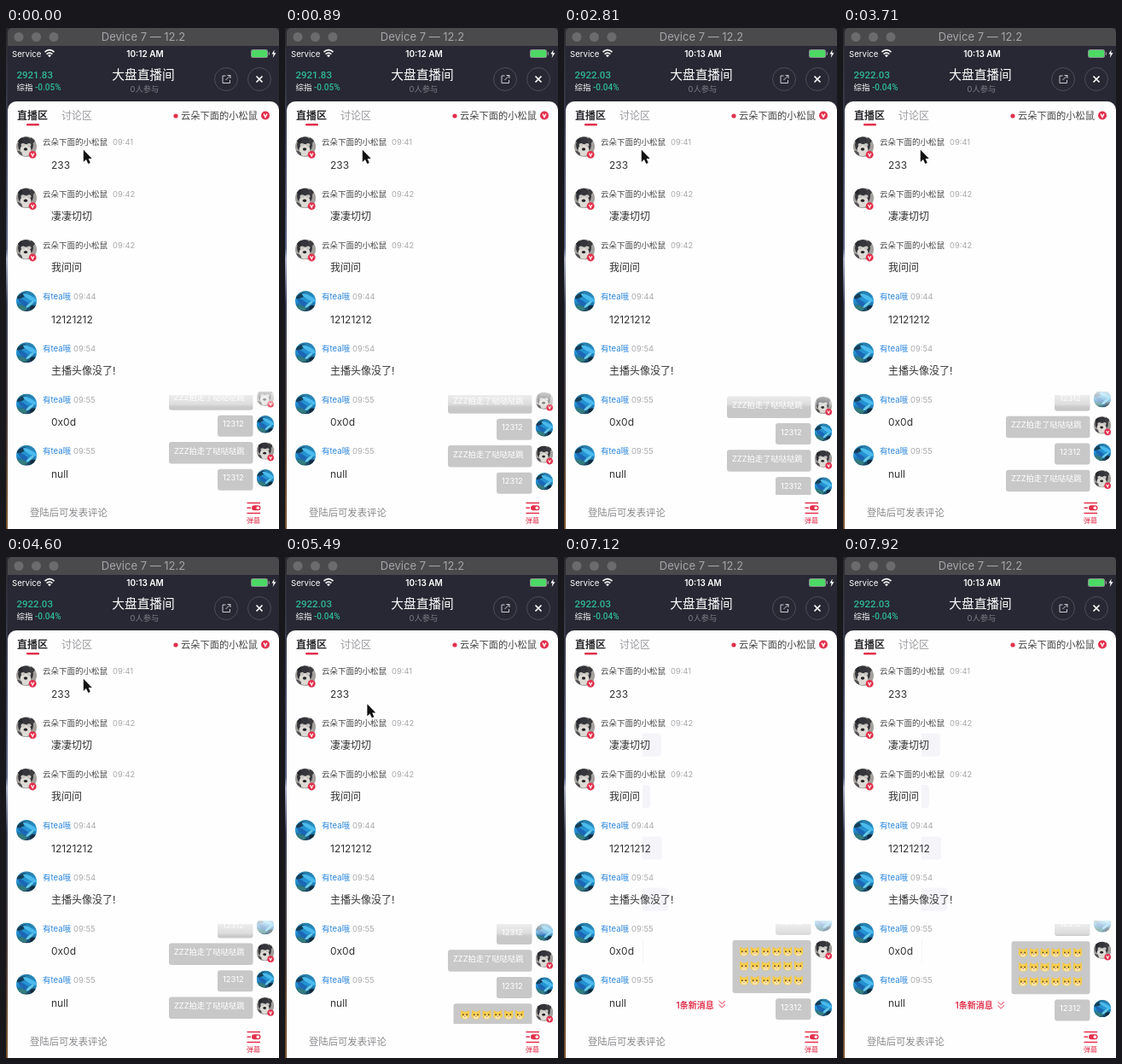
Animation, 320 px wide and 587 px high, one loop 8.02 s. Source, as an HTML page with a canvas:

```html
<!DOCTYPE html>
<html lang="zh">
<head>
<meta charset="utf-8">
<style>
html, body { margin: 0; width: 100%; height: 100%; overflow: hidden; background: #fff; }
canvas { display: block; width: 320px; height: 587px; }
</style>
</head>
<body>
<canvas id="stage"></canvas>
<script>
const canvas = document.getElementById('stage');
const c = canvas.getContext('2d');
const dpr = window.devicePixelRatio || 1;
canvas.width = 320 * dpr;
canvas.height = 587 * dpr;

const LOOP = 8020, STEP = 147, SLIDE = 450;
const RED = '#e2304c', GREEN = '#2fb996';
const HOST = '云朵下面的小松鼠', GUEST = '有tea哦';
const SANS = 'Inter, "Noto Sans CJK SC", "Noto Sans CJK", sans-serif';
const DIGITS = 'Roboto, "Noto Sans CJK SC", sans-serif';

const messages = [
  [HOST, '09:41', '233'], [HOST, '09:42', '凄凄切切', 114], [HOST, '09:42', '我问问', 101],
  [GUEST, '09:44', '12121212', 115], [GUEST, '09:54', '主播头像没了!', 150],
  [GUEST, '09:55', '0x0d', 93], [GUEST, '09:55', 'null']
];

// Floating comments: kinds, and the moment each one slides in
const kinds = {
  A: { x: 248, h: 25, text: '12312' },
  B: { x: 191, h: 25.5, text: 'ZZZ拍走了哒哒哒跳', host: true },
  E: { x: 197.5, h: 62, host: true }
};
const queue = [...'BABABABABABABAEAEAEA'];
const starts = [-9e3, -9e3, -9e3, -400, 310, 556, 1050, 1590, 2230, 2523,
  3310, 3700, 4080, 4570, 5250, 5720, 6290, 6670, 7050, 7430];

// Pointer path: time, x, y
const path = [[5300, 90, 142], [6150, 124, 322], [6321, 142, 392],
  [6468, 186, 465], [6615, 225, 535], [6762, 265, 600]];

const clamp = v => Math.min(1, Math.max(0, v));
const ease = p => p < .5 ? 2 * p * p : 1 - 2 * (1 - p) ** 2;

function text(s, x, y, size, color, weight = 400, align = 'left', family = SANS) {
  c.font = `${weight} ${size}px ${family}`;
  c.textAlign = align;
  c.fillStyle = color;
  c.fillText(s, x, y);
}
function rect(x, y, w, h, color, r = 0) {
  c.fillStyle = color;
  c.beginPath();
  c.roundRect(x, y, w, h, r);
  c.fill();
}
function oval(x, y, rx, color, ry = rx, turn = 0) {
  c.fillStyle = color;
  c.beginPath();
  c.ellipse(x, y, rx, ry, turn, 0, 7);
  c.fill();
}
function line(d, color, width = 1) {
  c.strokeStyle = color;
  c.lineWidth = width;
  c.stroke(new Path2D(d));
}
function clipped(shape, draw) {
  c.save();
  c.beginPath();
  shape();
  c.clip();
  draw();
  c.restore();
}
function fade(y0, y1, stops) {
  const g = c.createLinearGradient(0, y0, 0, y1);
  stops.forEach(([at, color]) => g.addColorStop(at, color));
  return g;
}

function badge(x, y, r) {
  oval(x, y, r, RED);
  const k = r * .38;
  line(`M${x - k} ${y - k}L${x} ${y + k}L${x + k} ${y - k}`, '#fff', r * .28);
}

function avatar(x, y, r, host) {
  c.save();
  c.translate(x, y);
  c.scale(r / 12, r / 12);
  clipped(() => c.arc(0, 0, 12, 0, 7), () => {
    if (host) {
      rect(-12, -12, 24, 24, '#a3a09c');
      oval(-1, -2, 9, '#34353a', 9.5);
      oval(-8, -9, 3, '#292a2e', 5, -.4);
      oval(7, -8, 3, '#3d3d40', 5, .4);
      oval(-1, 4, 6.5, '#dddad5', 7);
      oval(-4, -2, 2.5, '#c9c6c2', 2);
      oval(3, -2, 2.5, '#c9c6c2', 2);
      oval(-1, 3, 2.2, '#242428', 1.7);
      oval(-10, 9, 5, '#535255', 4);
    } else {
      rect(-12, -12, 24, 24, fade(-12, 12, [[0, '#287ba4'], [.5, '#2496d8'], [1, '#163a53']]));
      oval(-6, -6, 6, '#153f59', 2.5, -.5);
      oval(4, -4, 9, '#4bbbed', 2.4, .5);
      oval(-3, 2, 8, '#1c67b5', 2.5, .6);
      oval(4, 4, 6, '#65c9e7', 1.6, -.7);
      oval(-5, 8, 6, '#337b7e', 2.6, .3);
      oval(8, 8, 4, '#122d40', 3);
    }
  });
  c.restore();
  if (host) badge(x + r * .6, y + r * .78, r * .37);
}

function cat(x, y) {
  c.fillStyle = '#f5c644';
  c.fill(new Path2D(`M${x - 5} ${y}l.3-6 3.5 2.4h2.4l3.5-2.4.3 6z`));
  oval(x, y + .5, 5.2, '#f7ce50', 4.5);
  oval(x, y + 2.5, 3, '#f8e6ae', 2);
  for (const s of [-1, 1]) oval(x + s * 2.2, y - .3, .8, '#4b3a23', 1);
  oval(x, y + 1.7, .8, '#d87567', .6);
}

function windowBar() {
  rect(0, 0, 320, 587, fade(0, 587, [[0, '#29292c'], [.15, '#38394a'], [.44, '#596181'],
    [.46, '#a7adc2'], [.55, '#3a4056'], [.8, '#4a3e3c'], [1, '#7b552f']]));
  rect(2, 0, 318, 21, '#4a494c', [5, 5, 0, 0]);
  for (const x of [15, 35.5, 56]) oval(x, 10.5, 5.5, '#6b6a6d');
  text('Device 7 — 12.2', 161, 15, 13, '#a5a4a7', 400, 'center');
}

function header(t) {
  rect(2, 21, 318, 80, '#272833');
  text('Service', 7, 33.5, 9.6, '#fff');
  c.lineCap = 'butt';
  line('M45.5 28.2Q51 23.2 56.5 28.2M47.6 30.6Q51 27.5 54.4 30.6', '#fff', 1.7);
  c.fillStyle = '#fff';
  c.fill(new Path2D('M49 32Q51 30.5 53 32L51 34.2z'));
  text(t < 1900 ? '10:12 AM' : '10:13 AM', 163, 33.5, 10, '#fff', 600, 'center');
  rect(287, 25, 20, 10, '#8d8e94', 2.5);
  rect(288, 26, 18, 8, '#4cd964', 1.5);
  rect(307.7, 28, 1.3, 4, '#8d8e94', 1);
  c.fillStyle = '#fff';
  c.fill(new Path2D('M314.6 25.5L311.5 30.6H313.6L312.7 35L316.5 29.3H314.2z'));

  const early = t < 2600;
  text(early ? '2921.83' : '2922.03', 12.5, 59, 11.5, GREEN, 500, 'left', DIGITS);
  text('综指', 12.5, 73, 9.5, '#fff', 500);
  text(early ? '-0.05%' : '-0.04%', 34, 73, 10, GREEN, 500, 'left', DIGITS);
  text('大盘直播间', 161, 60, 14.7, '#fff', 500, 'center');
  text('0人参与', 162.5, 75, 9.3, '#7d7e87', 400, 'center');
  for (const x of [258, 297]) {
    c.strokeStyle = '#4b4c57';
    c.lineWidth = 1;
    c.beginPath();
    c.arc(x, 60, 13.5, 0, 7);
    c.stroke();
  }
  line('M257.5 56H254V64.5H262.5V61M259.5 55.5H263V59M263 55.5L257.5 61', '#c9cad0');
  line('M293.5 56.5L300.5 63.5M300.5 56.5L293.5 63.5', '#fff', 1.7);
}

function sheet(t) {
  rect(2, 86, 318, 501, '#fefefe', [10, 10, 0, 0]);
  text('直播区', 13, 107, 12, '#2a2a2e', 700);
  rect(24, 112, 15, 2.4, RED, 1.2);
  text('讨论区', 65, 107, 12, '#9a9a9e');
  oval(199, 103, 2.6, RED);
  text(HOST, 205, 107, 11.25, '#444');
  badge(304, 102.5, 5);

  messages.forEach(([name, time, body, edge], i) => {
    const y = i * 60.3, host = name === HOST;
    if (edge && t > 5870) {
      const right = i === 4 && t > 6300 ? 122 : edge;
      rect(92, 146.5 + y, right - 92, 27, '#f5f4f8', [0, 4, 4, 0]);
    }
    avatar(24, 139 + y, 12, host);
    text(name, 43, 137.3 + y, 9.5, host ? '#444' : '#2b86dc');
    text(time, host ? 125 : 79, 137.3 + y, 9.4, '#a9a9ad');
    text(body, 53, 164.8 + y, 12, '#333');
  });
}

function comments(t) {
  let bottom = 541;
  const height = k => kinds[k].h + 6.2;
  queue.forEach((k, i) => bottom += height(k) * (1 - ease(clamp((t - starts[i]) / SLIDE))));
  for (let i = queue.length - 1; i >= 0 && bottom > 420; i--) {
    const k = kinds[queue[i]], top = bottom - k.h;
    bottom -= height(queue[i]);
    if (top > 560) continue;
    clipped(() => c.rect(180, 430, 111, 117), () => {
      rect(k.x, top, 289.5 - k.x, k.h, '#c8c8c8', 3);
      if (k.text) text(k.text, k.x + 6, top + 13.6, 9.3, '#fff');
      else for (let n = 0; n < 18; n++) cat(211 + n % 6 * 12.8, top + 13.5 + Math.floor(n / 6) * 17);
    });
    clipped(() => c.rect(291, 426, 27, 121), () => avatar(304, top + 10.5, 10.3, k.host));
  }
  rect(190, 426, 126, 21, fade(426, 447, [[0, 'rgba(254,254,254,.8)'],
    [.7, 'rgba(254,254,254,.4)'], [.85, 'rgba(254,254,254,.05)'], [1, 'rgba(254,254,254,0)']]));
}

function notice(t) {
  if (t < 5730) return;
  text('1条新消息', 131.5, 528.7, 10, RED, 600);
  const y = 521 + (t > 6400 && t < 7800 ? Math.sin((t - 6400) / 150) : 0);
  line(`M181.5 ${y}l3.7 3.5 3.7-3.5m-7.4 4.3l3.7 3.5 3.7-3.5`, RED);
}

function footer() {
  text('登陆后可发表评论', 28, 571.5, 11.35, '#8a8a8e');
  line('M282.5 556.5H298M282.5 562.3H287M282.5 568.5H298', RED, 1.4);
  rect(288, 559.3, 10.5, 6, RED, 3);
  oval(295.3, 562.3, 1.8, '#fff');
  text('弹幕', 290, 580, 8, RED, 500, 'center');
}

function pointer(t) {
  let i = 0;
  while (i < path.length - 2 && t > path[i + 1][0]) i++;
  const [t0, x0, y0] = path[i], [t1, x1, y1] = path[i + 1];
  const p = clamp((t - t0) / (t1 - t0));
  c.save();
  c.translate(x0 + (x1 - x0) * p, y0 + (y1 - y0) * p);
  const arrow = 'M.8 .8V15L4 12L6.3 17L8.8 15.9L6.6 11H10.8z';
  line(arrow, '#fff', 1.8);
  c.fillStyle = '#111';
  c.fill(new Path2D(arrow));
  c.restore();
}

const origin = performance.now();
function draw() {
  const now = Math.max(0, performance.now() - origin) % LOOP;
  const t = Math.floor(now / STEP) * STEP;
  c.setTransform(dpr, 0, 0, dpr, 0, 0);
  windowBar();
  header(t);
  sheet(t);
  comments(t);
  notice(t);
  footer();
  pointer(t);
  requestAnimationFrame(draw);
}
draw();
</script>
</body>
</html>
```
